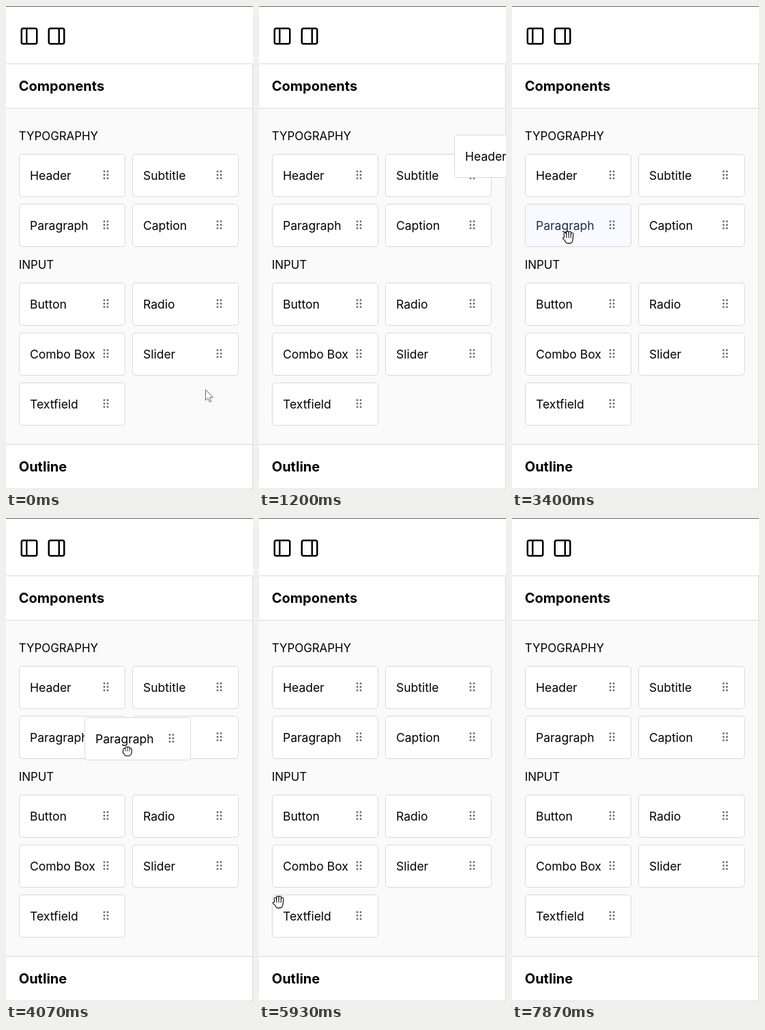
An HTML page with a canvas that plays this animation: 362 by 707 pixels, repeating every 7.94 s.

```html
<!DOCTYPE html>
<html lang="en">
<head>
<meta charset="utf-8">
<title>Component panel</title>
<style>
  html, body { margin: 0; width: 100%; height: 100%; overflow: hidden; background: #fff; }
  canvas { display: block; width: 362px; height: 707px; }
</style>
</head>
<body>
<canvas id="stage"></canvas>
<script>
const W = 362, H = 707, LOOP = 7940, STEP = 1000 / 15;
const LEFT = 19, CARD_W = 156, CARD_H = 63, GAP = 10;
const TEXT_LEFT = 18.75;
const LINE = '#d9d9d9';

const canvas = document.getElementById('stage');
const ctx = canvas.getContext('2d');
const ratio = window.devicePixelRatio || 1;
canvas.width = W * ratio;
canvas.height = H * ratio;

const groups = [
  { title: 'TYPOGRAPHY', baseline: 196, labels: ['Header', 'Subtitle', 'Paragraph', 'Caption'] },
  { title: 'INPUT', baseline: 384, labels: ['Button', 'Radio', 'Combo Box', 'Slider', 'Textfield'] }
];

const cards = groups.flatMap(({ baseline, labels }) => labels.map((label, i) => ({
  label,
  x: LEFT + (i % 2) * (CARD_W + GAP),
  y: baseline + 20 + (i >> 1) * (CARD_H + GAP)
})));

// The pointer glides to a place: start and end time, start and end point
const glide = (from, to, a, b) => ({
  from, to,
  at(t) {
    const u = 1 - (1 - clamp((t - from) / (to - from))) ** 3;
    return { x: a.x + (b.x - a.x) * u, y: a.y + (b.y - a.y) * u };
  }
});

// A card is pulled from the grab point, passing the given offset at time via
const pull = (label, from, to, grab, via, dx, dy, power) => ({
  from, to, grab,
  card: cards.find(card => card.label === label),
  at(t) {
    const u = ((t - from) / (via - from)) ** power;
    return { x: grab.x + dx * u, y: grab.y + dy * u };
  }
});

const point = (x, y) => ({ x, y });
const onHeader = point(120, 260), onSubtitle = point(241, 267), onParagraph = point(82, 338);
const besideField = point(12, 548), onField = point(56, 582);

const moves = [
  glide(0, 800, point(292, 560), onHeader),
  pull('Header', 800, 1533, onHeader, 1200, 267, -28, 1.1),
  glide(1600, 2200, point(380, 235), onSubtitle),
  pull('Subtitle', 2333, 2733, onSubtitle, 2467, 39, -5, 1.4),
  glide(3067, 3467, point(380, 300), onParagraph),
  pull('Paragraph', 3667, 4400, onParagraph, 4067, 96, 2, 2.2),
  glide(4800, 5600, point(380, 330), besideField),
  glide(5885, 6200, besideField, onField),
  pull('Textfield', 6333, 7000, onField, 6733, 332, -134, 1.6)
];

function clamp(v) {
  return Math.max(0, Math.min(1, v));
}

const moveAt = t => moves.findLast(move => t > move.from) || moves[0];
const pointerAt = t => moveAt(t).at(t);

function dragAt(t) {
  const move = moveAt(t);
  return move.card && t <= move.to ? move : null;
}

const isOver = (card, p) =>
  p.x >= card.x && p.x <= card.x + CARD_W && p.y >= card.y && p.y <= card.y + CARD_H;

// Share of the last 200 ms spent over the card
function hoverLevel(card, t) {
  let hits = 0;
  for (let k = 1; k <= 5; k++) {
    const past = t - k * 40;
    if (!dragAt(past) && isOver(card, pointerAt(past))) hits++;
  }
  return hits / 5;
}

function mix(a, b, u) {
  return `rgb(${a.map((v, i) => Math.round(v + (b[i] - v) * u)).join(',')})`;
}

function text(label, x, y, size, weight = 400, color = '#000') {
  ctx.font = `${weight} ${size}px Inter, sans-serif`;
  ctx.fillStyle = color;
  ctx.fillText(label, x, y);
}

function rect(x, y, w, h, color) {
  ctx.fillStyle = color;
  ctx.fillRect(x, y, w, h);
}

function drawCard(label, x, y, hover) {
  ctx.beginPath();
  ctx.roundRect(x + 0.5, y + 0.5, CARD_W - 1, CARD_H - 1, 4.5);
  ctx.fillStyle = mix([255, 255, 255], [248, 250, 255], hover);
  ctx.fill();
  ctx.lineWidth = 1;
  ctx.strokeStyle = mix([217, 217, 217], [212, 217, 226], hover);
  ctx.stroke();
  text(label, x + 16, y + 38, 17.5, 400, mix([0, 0, 0], [28, 43, 70], hover));
  ctx.fillStyle = '#6f6f6f';
  for (let i = 0; i < 6; i++) {
    ctx.beginPath();
    ctx.arc(x + 125 + (i % 2) * 5, y + 25.7 + (i >> 1) * 5, 1.45, 0, 7);
    ctx.fill();
  }
}

function drawPanelIcon(x, divider) {
  ctx.lineWidth = 2.5;
  ctx.strokeStyle = '#000';
  ctx.beginPath();
  ctx.roundRect(x + 3.75, 32.75, 22.5, 22.5, 2.5);
  ctx.moveTo(x + divider, 32.75);
  ctx.lineTo(x + divider, 55.25);
  ctx.stroke();
}

function drawPanel() {
  rect(0, 0, W, H, '#fff');
  rect(0, 0, W, 1, '#666');
  rect(0, 150, W, 490, '#fafafa');
  for (const y of [84, 149, 640, 705]) rect(0, y, W, 1, LINE);
  rect(W - 1, 84, 1, H - 84, LINE);
  drawPanelIcon(19, 11.25);
  drawPanelIcon(59, 18.75);
  text('Components', TEXT_LEFT, 124, 20, 700);
  text('Outline', TEXT_LEFT, 680, 20, 700);
  for (const { title, baseline } of groups) text(title, TEXT_LEFT, baseline, 16.9);
}

function drawArrow() {
  ctx.beginPath();
  ctx.moveTo(0.5, 0.5);
  ctx.lineTo(0.5, 16);
  ctx.lineTo(4, 12.7);
  ctx.lineTo(6.4, 18.4);
  ctx.lineTo(8.9, 17.3);
  ctx.lineTo(6.5, 11.8);
  ctx.lineTo(11.3, 11.5);
  ctx.closePath();
  ctx.fillStyle = '#fff';
  ctx.fill();
  ctx.lineWidth = 0.9;
  ctx.strokeStyle = '#555';
  ctx.stroke();
}

// Four fingers in an arc, a thumb and a round palm; black first, white inside
function drawHand(closed) {
  const reach = closed ? 4.4 : 7.4, fan = closed ? 1 : 1.15;
  ctx.lineCap = ctx.lineJoin = 'round';
  for (const [color, width] of [['#000', 4.4], ['#fff', 2.2]]) {
    ctx.strokeStyle = ctx.fillStyle = color;
    ctx.lineWidth = width;
    ctx.beginPath();
    for (let i = -1.5; i <= 1.5; i++) {
      ctx.moveTo(i * 3, 2);
      ctx.lineTo(i * 3 * fan, i * i - reach);
    }
    ctx.moveTo(-3, 4);
    ctx.lineTo(closed ? -5.4 : -6.8, 1.5);
    ctx.stroke();
    ctx.beginPath();
    ctx.roundRect(-3.8, 2, 8, closed ? 3.8 : 5, [0, 0, 3, 3]);
    ctx.fill();
    ctx.stroke();
  }
}

function draw(t) {
  const pointer = pointerAt(t);
  const drag = dragAt(t);
  ctx.setTransform(ratio, 0, 0, ratio, 0, 0);
  drawPanel();
  for (const card of cards) {
    drawCard(card.label, card.x, card.y, drag ? 0 : hoverLevel(card, t));
  }
  if (drag) {
    const { card, grab, from } = drag;
    drawCard(
      card.label,
      Math.round(card.x + pointer.x - grab.x),
      Math.round(card.y + pointer.y - grab.y),
      clamp((from + 300 - t) / 150)
    );
  }
  ctx.save();
  ctx.translate(Math.round(pointer.x), Math.round(pointer.y));
  if (drag) drawHand(true);
  else if (cards.some(card => isOver(card, pointer))) drawHand(false);
  else drawArrow();
  ctx.restore();
}

function tick() {
  const t = performance.now() % LOOP;
  draw(Math.min(118, Math.floor((t + 4) / STEP)) * STEP);
  requestAnimationFrame(tick);
}
tick();
</script>
</body>
</html>
```
